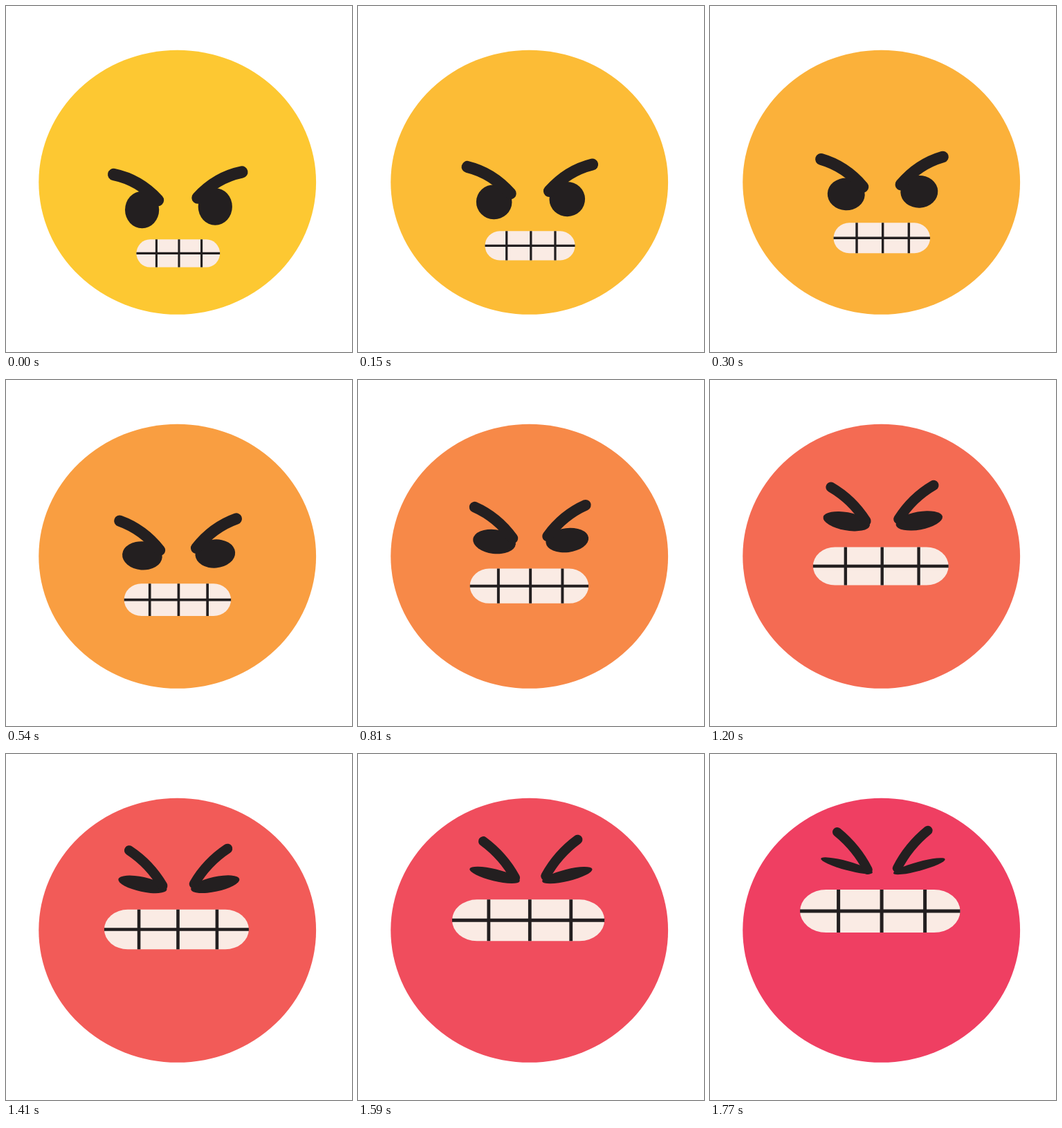
An HTML page for the animation above (1.8 s loop, 500x500 px).

```html
<!DOCTYPE html>
<html lang="en">
<head>
<meta charset="utf-8">
<title>Angry face</title>
<style>
  html, body { margin: 0; width: 100%; height: 100%; overflow: hidden; background: #fff; }
  svg { display: block; width: 100vw; height: 100vh; }
</style>
</head>
<body>
<svg viewBox="0 0 500 500">
  <ellipse id="face" cx="247.7" cy="254.8" rx="200.4" ry="191"/>
  <g fill="#231f20">
    <ellipse id="leftEye"/>
    <ellipse id="rightEye"/>
  </g>
  <g fill="none" stroke="#231f20" stroke-linecap="round">
    <path id="leftBrow"/>
    <path id="rightBrow"/>
  </g>
  <rect id="mouth" fill="#faebe4"/>
  <path id="gaps" fill="none" stroke="#231f20"/>
</svg>
<script>
const LOOP = 1800, STEP = 30, LAST = LOOP / STEP - 1;

// Anger grows from 0 to 1 over the loop; mix blends a calm and a furious value.
let anger = 0;
const mix = (calm, furious) => calm + (furious - calm) * anger;

function setAttrs(id, attrs) {
  const element = document.getElementById(id);
  for (const name in attrs) element.setAttribute(name, attrs[name]);
}

function drawFace() {
  const red = mix(253, 239), green = mix(200, 63), blue = mix(50, 98);
  setAttrs("face", { fill: `rgb(${[red, green, blue].map(Math.round)})` });
}

// The eye flattens, widens and tilts towards the nose.
function drawEye(id, x, y, side) {
  setAttrs(id, {
    rx: mix(24.6, 38.7),
    ry: mix(26.8, 6.5),
    transform: `translate(${x} ${y}) rotate(${-side * mix(0, 15.3)})`
  });
}

// The brow is an arc from its inner end, mirrored by side.
function drawBrow(id, x, y, side) {
  const bendX = side * mix(27, 16), bendY = -mix(29.5, 31.5);
  const outerX = side * mix(63.8, 44.2), outerY = -mix(37, 54.5);
  setAttrs(id, {
    d: `M${x} ${y}q${bendX} ${bendY} ${outerX} ${outerY}`,
    "stroke-width": mix(17.4, 13.6)
  });
}

// Tooth gaps keep their proportions while the mouth grows.
function drawMouth() {
  const x = mix(248.8, 245.8), y = mix(357.4, 227);
  const width = mix(120.7, 231.5), height = mix(40.3, 62);
  const left = x - width / 2, top = y - height / 2;
  setAttrs("mouth", { x: left, y: top, width, height, rx: width * 0.163, ry: height / 2 });

  const columns = [-1, 0, 1].map(i => `M${x + width * (0.01 + 0.27 * i)} ${top}v${height}`);
  setAttrs("gaps", {
    d: `${columns.join("")}M${left} ${y}h${width}`,
    "stroke-width": mix(3.1, 5)
  });
}

function draw(time) {
  anger = Math.floor((time % LOOP) / STEP) / LAST;
  drawFace();
  drawEye("leftEye", mix(196.6, 197.6), mix(294.5, 161.3), -1);
  drawEye("rightEye", 302.3, mix(290, 162.2), 1);
  drawBrow("leftBrow", mix(219.5, 228), mix(280.5, 167.3), -1);
  drawBrow("rightBrow", mix(277, 270.6), mix(277, 165), 1);
  drawMouth();
}

const start = performance.now();
function tick() {
  draw(performance.now() - start);
  requestAnimationFrame(tick);
}
tick();
</script>
</body>
</html>
```
